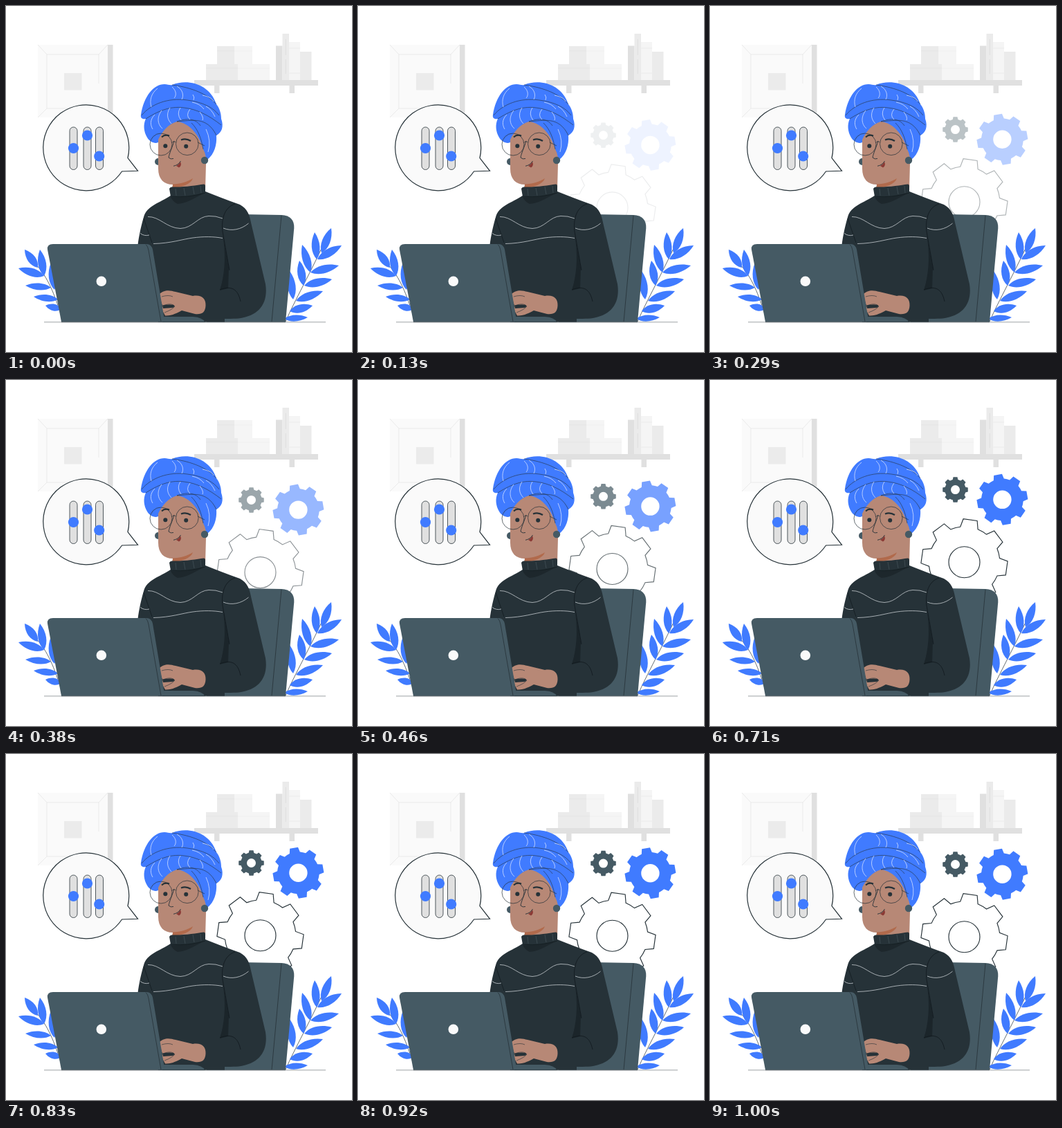
These frames come from a looping animation (500 by 500 pixels, 1.04 s). An HTML page with a canvas:

```html
<!DOCTYPE html>
<html lang="en">
<head>
<meta charset="utf-8">
<title>Working with settings</title>
<style>
html, body { margin: 0; width: 100%; height: 100%; overflow: hidden; background: #fff; }
canvas { display: block; width: 500px; height: 500px; }
</style>
</head>
<body>
<canvas id="stage" width="500" height="500"></canvas>
<script>
const ctx = document.getElementById('stage').getContext('2d');
const BLUE = '#407bff', DARK = '#263238', SLATE = '#455a64', SKIN = '#b78876';
const LOOP = 1040, RISE = 30, STEPS = 25;

function fill(d, color) {
  ctx.fillStyle = color;
  ctx.fill(new Path2D(d));
}

function line(d, color, width = 0.7) {
  ctx.strokeStyle = color;
  ctx.lineWidth = width;
  ctx.stroke(new Path2D(d));
}

function rect(x1, y1, x2, y2, color) {
  ctx.fillStyle = color;
  ctx.fillRect(x1, y1, x2 - x1, y2 - y1);
}

function circle(x, y, r, color, stroke, width = 0.7) {
  ctx.beginPath();
  ctx.arc(x, y, r, 0, Math.PI * 2);
  if (color) { ctx.fillStyle = color; ctx.fill(); }
  if (stroke) { ctx.strokeStyle = stroke; ctx.lineWidth = width; ctx.stroke(); }
}

function leaf(bx, by, tx, ty, w = 7.8) {
  const dx = tx - bx, dy = ty - by, len = Math.hypot(dx, dy);
  const nx = -dy / len * w, ny = dx / len * w;
  ctx.fillStyle = BLUE;
  ctx.beginPath();
  ctx.moveTo(bx, by);
  ctx.bezierCurveTo(bx + dx * .25 + nx, by + dy * .25 + ny, bx + dx * .65 + nx, by + dy * .65 + ny, tx, ty);
  ctx.bezierCurveTo(bx + dx * .65 - nx, by + dy * .65 - ny, bx + dx * .25 - nx, by + dy * .25 - ny, bx, by);
  ctx.fill();
}

function gear(x, y, r, hole, turn, color, outlined) {
  const rad = Math.PI / 180, base = r * 0.82;
  ctx.beginPath();
  for (let k = 0; k < 8; k++) {
    const a = (turn + k * 45) * rad;
    ctx.arc(x, y, base, a - 30 * rad, a - 14.5 * rad);
    ctx.lineTo(x + r * Math.cos(a - 9.3 * rad), y + r * Math.sin(a - 9.3 * rad));
    ctx.lineTo(x + r * Math.cos(a + 9.3 * rad), y + r * Math.sin(a + 9.3 * rad));
    ctx.lineTo(x + base * Math.cos(a + 14.5 * rad), y + base * Math.sin(a + 14.5 * rad));
  }
  ctx.closePath();
  ctx.moveTo(x + hole, y);
  ctx.arc(x, y, hole, 0, Math.PI * 2, true);
  if (outlined) {
    ctx.strokeStyle = color;
    ctx.lineWidth = 1.15;
    ctx.stroke();
  } else {
    ctx.fillStyle = color;
    ctx.fill('evenodd');
  }
}

function drawRoom() {
  rect(147, 56, 154.5, 161, '#e0e0e0');
  rect(46, 56, 147, 161, '#fafafa');
  line('M46 56L59 70H134V112M147 56L134 70M59 70V148L46 161M59 148H134', '#e3e3e3');
  rect(84, 97, 109.5, 121.5, '#ebebeb');

  rect(272, 107, 451, 115, '#e0e0e0');
  rect(301, 115, 308.5, 126, '#e0e0e0');
  rect(409.5, 115, 417, 126, '#e0e0e0');
  rect(289, 84, 335, 107, '#ebebeb');
  rect(335, 84, 381, 107, '#f5f5f5');
  rect(305, 58, 330, 84, '#ebebeb');
  rect(330, 58, 356, 84, '#f5f5f5');
  line('M289 90H335M305 65H330', '#e0e0e0', 0.6);
  line('M335 90H381M330 65H356', '#ebebeb', 0.6);
  rect(390, 57.5, 399.5, 107, '#e0e0e0');
  rect(399.5, 40, 409, 107, '#ebebeb');
  rect(409, 52, 425, 107, '#f5f5f5');
  rect(425, 66, 441.5, 107, '#ebebeb');
  line('M404.3 48V71M404.3 77V98', '#dcdcdc', 0.9);
  line('M409 61H425M409 97H425', '#e6e6e6');
}

function drawGears(p) {
  ctx.save();
  ctx.globalAlpha = Math.max(0, Math.min(1, p));
  ctx.translate(0, RISE * (1 - p));
  gear(354.5, 159.5, 18.5, 6.5, 0, SLATE);
  gear(422.4, 173.7, 37, 13.2, -10, BLUE);
  gear(367.5, 264.2, 62.6, 22.5, 8, DARK, true);
  ctx.restore();
}

function drawPlants() {
  line('M404 456C416 428 440 386 466 329', DARK);
  leaf(456, 357, 470, 321);
  leaf(450, 366, 485, 346);
  leaf(449, 366, 446, 327);
  leaf(440, 385, 481, 375);
  leaf(440, 385, 428, 345);
  leaf(431, 404, 471, 395);
  leaf(430, 404, 424, 368);
  leaf(419, 426, 458, 412);
  leaf(415, 424, 410, 383);
  leaf(410, 441, 443, 433);
  leaf(402, 452, 436, 450, 6);

  line('M40 370C58 388 68 410 79 445', DARK);
  leaf(46, 378, 27, 352);
  leaf(55, 390, 49, 352);
  leaf(55, 390, 18, 379);
  leaf(65, 407, 28, 404, 6.5);
  leaf(70, 410, 65, 371);
  leaf(75, 424, 40, 420, 6.5);
  leaf(80, 438, 57, 433, 6.5);
}

function drawBubble() {
  const d = 'M176 219.5A62 62 0 1 0 167.5 239L190.5 238.3Z';
  fill(d, '#fafafa');
  line(d, DARK, 1.2);
  for (const x of [92, 112, 129.5]) {
    ctx.beginPath();
    ctx.roundRect(x, 175, 11, 61.5, 5.5);
    ctx.fillStyle = '#e0e0e0';
    ctx.fill();
    ctx.strokeStyle = DARK;
    ctx.lineWidth = 0.8;
    ctx.stroke();
  }
  circle(97.5, 205.5, 7.6, BLUE);
  circle(117.5, 187, 7.6, BLUE);
  circle(134.7, 217, 7.6, BLUE);
}

function drawChair() {
  fill('M340 301L398 302Q417 303 416.3 321L404 456.5H290V320Z', SLATE);
  line('M398 303L384 456', DARK, 0.8);
}

function drawHead() {
  circle(220, 225, 5, SLATE);
  fill('M195 157C199 131 213 113 229 113C234 113 237 115 240 114C262 105 294 112 304 142C309 148 311 156 311 163C315 174 312 183 304 187C305 201 301 214 291 222L250 230L222 195C218 201 208 197 204 190C199 182 198 171 202 163C197 164 194 162 195 157Z', BLUE);
  // face and neck
  fill('M220 193C226 181 234 171 247 167C266 169 280 188 285 207Q290 216 289 228L288 265C275 277 250 275 240 267L241 258C228 258 220 250 220 235Z', SKIN);
  fill('M241 257.5C252 257 263 254 270 249C267 258 254 262 240.5 263Z', '#b16a4c');
  // turban folds
  line('M202 163C218 153 236 144 257 147C276 149 293 158 311 172M196 158C209 142 234 132 262 136C285 139 300 147 308 158M240 114C270 118 292 128 304 142M247 167C267 166 290 158 304 187M247 167C264 161 275 164 281 173M285 207C282 190 277 178 268 169', DARK, 0.6);
  const light = '#d3e0ff';
  line('M219 119C210 126 207 136 210 146M240 117C247 123 246 130 243 133M247 116C256 121 257 130 254 135M270 128Q273 132 271 136M284 129C294 131 298 134 300 138', light, 0.8);
  line('M215 157C207 165 209 173 212 178M225 151C216 163 221 173 226 177M237 147C230 158 235 166 239 170M252 147Q246 156 253 165M266 149Q259 158 266 164M280 153Q286 161 284 165M269 139Q280 141 286 149M289 145Q297 149 302 160M289 178Q297 195 292 211', light, 0.8);

  circle(287, 223, 5.2, SLATE);
  // features
  line('M225 189.5Q230 185 236 187.8', DARK, 2.2);
  line('M253 193.5Q260 190.5 267 195', DARK, 2.2);
  circle(230.3, 202.3, 3, DARK);
  circle(260.2, 202.8, 3, DARK);
  circle(224, 200, 16, null, DARK, 0.7);
  circle(261.8, 199.3, 16.3, null, DARK, 0.7);
  line('M239.5 198Q242 194 245.5 197M277 197L287 202', DARK, 0.7);
  line('M243 195C240 205 236 213 235 219Q238 222 242 220.5', DARK, 0.9);
  fill('M246 231Q250 229 252 225Q254.5 231 250 233.5Z', '#8b3a35');
  line('M242 231.3Q249 230 252.5 224', DARK, 0.9);
}

function drawBody() {
  fill('M238 274C223 284 203 289 199 305C194 322 191 338 190 350L220 456.5H316V452C328 452 338 452 346 449.5C367 444 379 428 375 402L354 313C352 302 349 293 338 287C320 281 304 274 288 268Z', DARK);
  // collar
  fill('M236 264Q237 261 241 261.5C258 262 275 259 286 257.5Q288 257.5 288 260V271C273 274 257 277 238 275.5Z', DARK);
  fill('M238 276C255 277 272 274 288 270C275 275 264 285 248 286Q241 283 238 276Z', '#1d272c');
  line('M245 264L246 274M257 263L259 274M270 261L272 272M281 260L282 270', '#4b5960', 0.6);
  line('M238 275C257 277 273 274 288 270', '#111a1e', 0.7);
  // folds and sleeve seam
  fill('M313 330L322 378L321 408L309 411C315 392 319 365 313 330Z', '#1b252a');
  line('M331 286C315 291 311 309 313 326L323 382M309 410C325 404 335 408 339 427', '#11191d', 0.8);
  line('M199 307L211 342', '#11191d', 0.7);
  // knit stripes
  const pale = '#cfd5d8';
  line('M205 304.5C222 304 232 321 252 321.5C270 321 277 304 293 303.5Q303 303 313 307', pale, 0.75);
  line('M213 343.5C238 343 255 337 270 335C285 333 300 333 313 335.5', pale, 0.75);
  line('M194 328.5Q200 333 207 331M314 321C326 326 340 323 350.5 314', pale, 0.75);
}

function drawDesk() {
  fill('M226 430L245 431L259 440L288 446V456.5H226Z', DARK);
  fill('M226 449H270Q284 450 287 456.5H226Z', SLATE);
  // hand
  fill('M221 417C229 409 237 411 245 413L270 419C283 417 289 423 288.5 433C288 443 283 446 273 445L254 440C248 443 240 448 230 447.5L226 440V433Z', SKIN);
  fill('M226 432.5Q236 431 242 432Q245 434 241 436L227 437Z', DARK);
  line('M227 433C234 430 241 430 244 434Q240 439 229 443M225 420Q235 417 241 420', DARK, 0.6);

  // laptop lid
  fill('M60 352Q59 344 68 344H203Q210 344 212 352L229.5 456.5H80Z', SLATE);
  line('M202 344.5Q205 347 206 353L224 456', DARK, 0.8);
  circle(137.8, 397.8, 7.3, '#fafafa');
  line('M55 456.8H462', DARK, 0.45);
  line('M80 456.8H404', DARK, 0.5);
}

// Cubic Bezier ease with a slight overshoot
function ease(t) {
  if (t <= 0 || t >= 1) return t <= 0 ? 0 : 1;
  const bez = (s, a, b) => 3 * (1 - s) * (1 - s) * s * a + 3 * (1 - s) * s * s * b + s * s * s;
  let lo = 0, hi = 1;
  for (let i = 0; i < 24; i++) {
    const mid = (lo + hi) / 2;
    if (bez(mid, 0.36, 0.5) < t) lo = mid; else hi = mid;
  }
  return bez(lo, -0.01, 1.38);
}

// 24 steps a second, each starting on a multiple of 10 ms
function stepAt(ms) {
  const n = Math.floor((ms + 5) * 24 / 1000);
  return ms < Math.round(n * 100 / 24) * 10 ? n - 1 : n;
}

function draw(ms) {
  const n = stepAt(ms);
  ctx.fillStyle = '#fff';
  ctx.fillRect(0, 0, 500, 500);
  drawRoom();
  if (n >= 3) drawGears(ease((n + 1) / STEPS));
  drawPlants();
  drawBubble();
  drawChair();
  drawHead();
  drawBody();
  drawDesk();
}

const start = performance.now();
function tick() {
  draw((performance.now() - start) % LOOP);
  requestAnimationFrame(tick);
}
tick();
</script>
</body>
</html>
```
